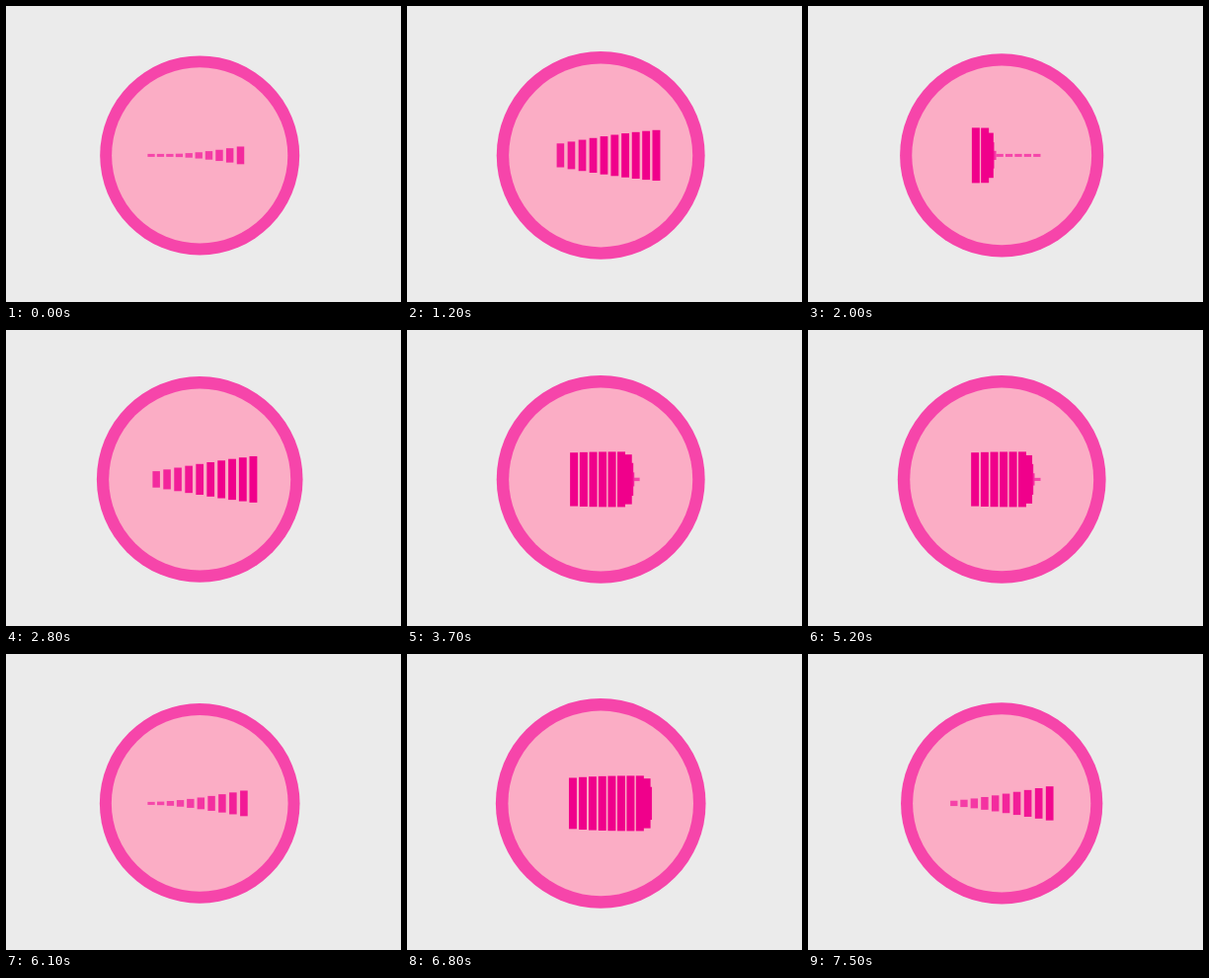
These frames come from a looping animation (400 px wide and 300 px high, 7.6 s). An HTML page with a canvas:

```html
<!DOCTYPE html>
<html lang="en">
<head>
<meta charset="utf-8">
<title>Pulsing bars</title>
<style>
  html, body { margin: 0; width: 100%; height: 100%; overflow: hidden; background: #ebebeb; }
  canvas { display: block; }
</style>
</head>
<body>
<canvas id="stage" width="400" height="300"></canvas>
<script>
  const ctx = document.getElementById('stage').getContext('2d');
  const LOOP = 7600;
  const PERIOD = 1505;
  const STAGGER = 45;
  const BARS = 10;
  const CX = 196.2;
  const CY = 151.4;
  const SOFT = [245, 70, 170];
  const DEEP = [240, 0, 139];

  const mod = (a, n) => ((a % n) + n) % n;
  const fall = x => (1 + Math.cos(Math.PI * x)) / 2;
  const mix = (a, b, k) => 'rgb(' + a.map((v, i) => Math.round(v + (b[i] - v) * k)) + ')';

  // Quick rise, slow decay, then rest; returns 0..1.
  function level(time) {
    const t = mod(time - 275, PERIOD);
    if (t < 185) return 1 - fall(t / 185);
    if (t < 205) return 1;
    if (t < 1325) return fall(Math.pow((t - 205) / 1120, 1.3));
    return 0;
  }

  function disc(radius, color) {
    ctx.fillStyle = color;
    ctx.beginPath();
    ctx.arc(CX, CY, radius, 0, Math.PI * 2);
    ctx.fill();
  }

  function drawBar(i, phase) {
    const s = level(phase - i * STAGGER);
    const x = 143.4 + 9.42 * i + 22.5 * Math.pow(s, 1.1);
    const w = 7.3 + 0.7 * s;
    const h = 3 + 53 * s;
    ctx.fillStyle = mix(SOFT, DEEP, Math.min(1, s * 1.5));
    ctx.fillRect(x, CY - h / 2, w, h);
  }

  function draw(time) {
    // The first second starts slightly ahead and settles into the beat.
    const phase = time + 178 * Math.max(0, 1 - time / 1000);
    const radius = 104 + 3 * Math.cos(2 * Math.PI * (phase - 945) / PERIOD);
    ctx.fillStyle = '#ebebeb';
    ctx.fillRect(0, 0, 400, 300);
    disc(radius, '#f645aa');
    disc(radius * 0.882, '#fbadc5');
    for (let i = BARS - 1; i >= 0; i--) drawBar(i, phase);
  }

  const start = performance.now();
  function tick(now) {
    draw(mod(now - start, LOOP));
    requestAnimationFrame(tick);
  }
  draw(0);
  requestAnimationFrame(tick);
</script>
</body>
</html>
```
